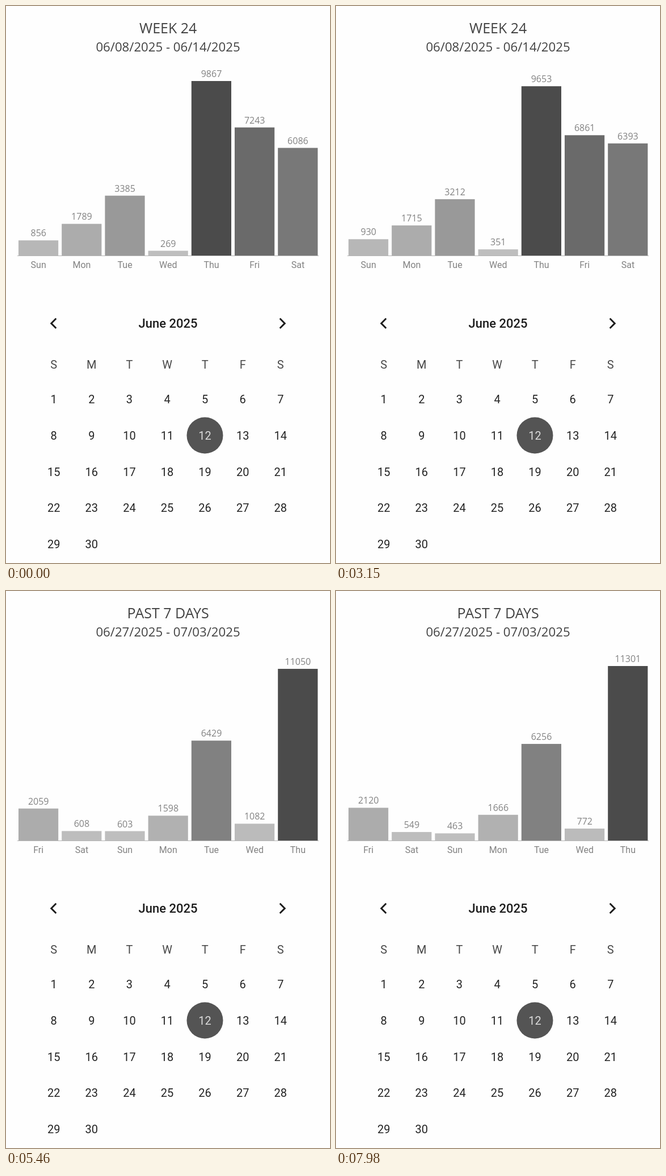
Recreate the animation shown at these times as an HTML page with a canvas. Size 571x980 px, loop 8 s.

```html
<!DOCTYPE html>
<html lang="en">
<head>
<meta charset="utf-8">
<title>Weekly chart</title>
<style>
html, body { margin: 0; height: 100%; overflow: hidden; background: #fefefe; }
canvas { display: block; }
</style>
</head>
<body>
<canvas id="stage" width="571" height="980"></canvas>
<script>
const ctx = document.getElementById('stage').getContext('2d');
const LOOP = 8000, STEP = 70, BASE = 439, FULL = 307;
const SANS = '"Open Sans", sans-serif', ROBOTO = 'Roboto, sans-serif';

const week = {
  title: 'WEEK 24', range: '06/08/2025 - 06/14/2025',
  days: ['Sun', 'Mon', 'Tue', 'Wed', 'Thu', 'Fri', 'Sat'],
  values: [856, 1789, 3385, 269, 9867, 7243, 6086]
};
const past = {
  title: 'PAST 7 DAYS', range: '06/27/2025 - 07/03/2025',
  days: ['Fri', 'Sat', 'Sun', 'Mon', 'Tue', 'Wed', 'Thu'],
  values: [2120, 549, 463, 1666, 6256, 772, 11301]
};

// Each switch of view: start, duration, views, and the touch point if visible
const switches = [
  { start: -LOOP, span: 1, from: past, to: week },
  { start: 1190, span: 1250, from: week, to: past, touch: [238, 51, 14] },
  { start: 2660, span: 1200, from: past, to: week },
  { start: 4747.53, span: 1626.4, from: week, to: past, touch: [240, 39, 13.5] }
];

const mix = (a, b, p) => a + (b - a) * p;
const expoOut = u => u <= 0 ? 0 : u >= 1 ? 1 : 1 - 2 ** (-10 * u);

function text(str, x, y, font, color) {
  ctx.font = font;
  ctx.fillStyle = color;
  ctx.fillText(str, x, y);
}

function disc(x, y, r) {
  ctx.beginPath();
  ctx.arc(x, y, r, 0, 2 * Math.PI);
}

// The largest value is darkest, the smallest lightest
function shade(value, values) {
  const hi = Math.max(...values), lo = Math.min(...values);
  const g = Math.round(mix(75, 190, (hi - value) / (hi - lo)));
  return `rgb(${g},${g},${g})`;
}

function drawChart({ from, to }, p) {
  text(to.title, 285.7, 48, '25px ' + SANS, '#424242');
  text(to.range, 285.5, 80, '22.2px ' + SANS, '#424242');
  const top = mix(Math.max(...from.values), Math.max(...to.values), p);
  to.values.forEach((target, i) => {
    const value = mix(from.values[i], target, p);
    const x = 22 + 76.2 * i, h = value / top * FULL;
    ctx.fillStyle = shade(target, to.values);
    ctx.fillRect(x, BASE - h, 70.2, h);
    text(Math.floor(value + 1e-6), x + 35.2, BASE - h - 7, '16px ' + SANS, '#828282');
    text(to.days[i], x + 35.2, 461, '16px ' + ROBOTO, '#828282');
  });
  ctx.fillStyle = '#b4b4b4';
  ctx.fillRect(20, BASE, 531, 1);
}

function chevron(x, dir) {
  ctx.beginPath();
  ctx.moveTo(x - 4.3 * dir, 549.8);
  ctx.lineTo(x + 4.3 * dir, 558.4);
  ctx.lineTo(x - 4.3 * dir, 567);
  ctx.strokeStyle = '#1c1c1c';
  ctx.lineWidth = 2.9;
  ctx.stroke();
}

function drawCalendar() {
  const col = i => 84.2 + 66.6 * i;
  text('June 2025', 285.5, 566, '500 22px ' + ROBOTO, '#1c1c1c');
  chevron(84, -1);
  chevron(487, 1);
  [...'SMTWTFS'].forEach((d, i) => text(d, col(i), 638, '20px ' + ROBOTO, '#484848'));
  disc(350.5, 755.5, 32);
  ctx.fillStyle = '#545454';
  ctx.fill();
  for (let d = 1; d <= 30; d++) {
    const i = d - 1;
    text(d, col(i % 7), 699 + 63.75 * Math.floor(i / 7), '20px ' + ROBOTO,
      d === 12 ? '#dcdcdc' : '#242424');
  }
}

function drawTouch({ start, touch }, t) {
  const age = t - start;
  if (!touch || age < -100 || age > 200) return;
  ctx.globalAlpha = Math.min(1, 1 - age / 200);
  disc(...touch);
  ctx.fillStyle = 'rgba(255,255,255,.35)';
  ctx.fill();
  ctx.strokeStyle = '#c2c2c2';
  ctx.lineWidth = 2;
  ctx.stroke();
  ctx.globalAlpha = 1;
}

function draw(now) {
  const t = Math.floor(now % LOOP / STEP) * STEP;
  const view = switches.filter(s => s.start <= t).pop();
  ctx.fillStyle = '#fefefe';
  ctx.fillRect(0, 0, 571, 980);
  ctx.textAlign = 'center';
  drawChart(view, expoOut((t - view.start) / view.span));
  drawCalendar();
  switches.forEach(s => drawTouch(s, t));
}

const begin = performance.now();
function tick() {
  draw(performance.now() - begin);
  requestAnimationFrame(tick);
}
tick();
</script>
</body>
</html>
```
